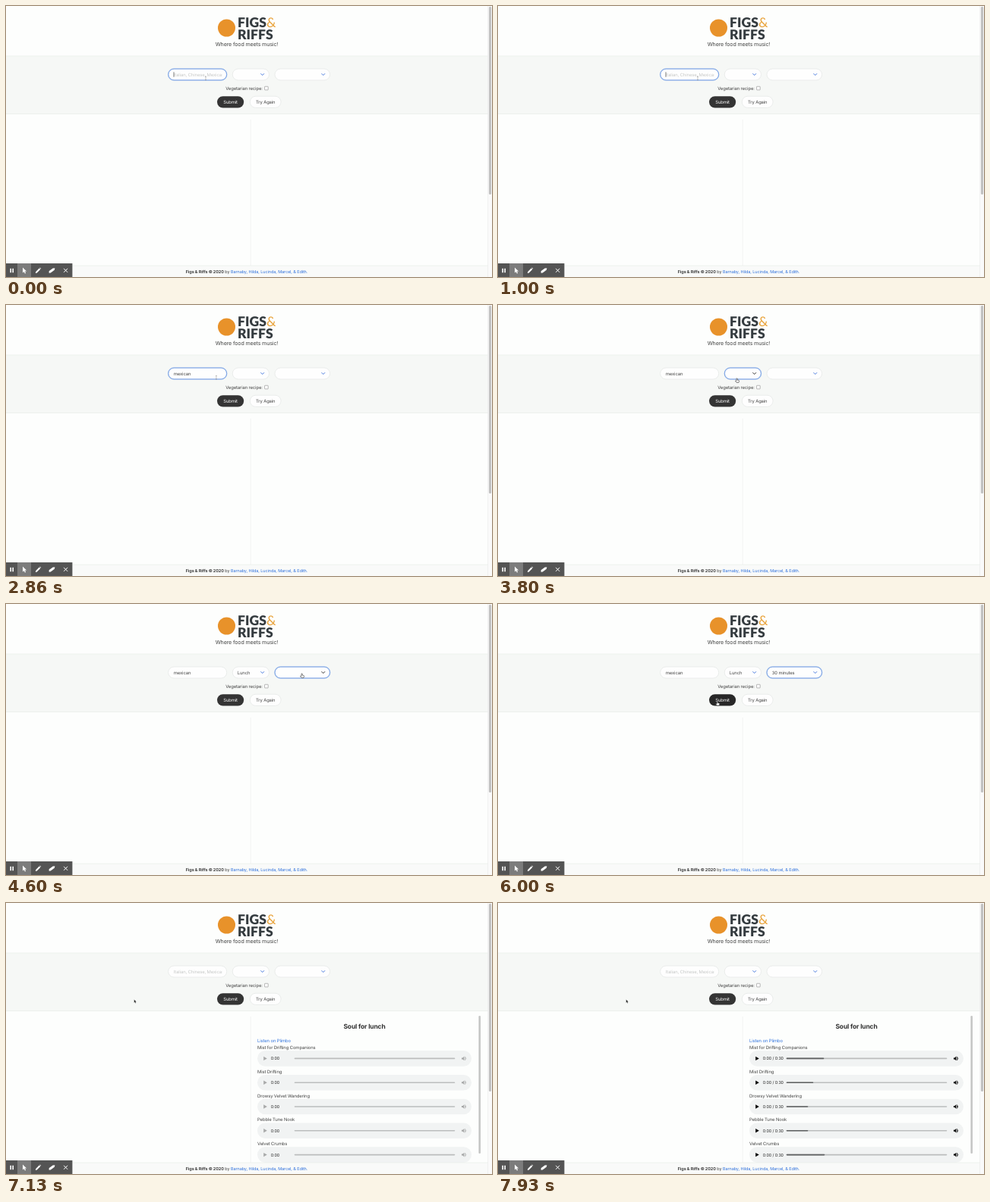
An HTML page that plays this animation: 640x358 px, repeating every 8 s.

```html
<!DOCTYPE html>
<html lang="en">
<head>
<meta charset="utf-8">
<title>Recipe and music search</title>
<style>
  html, body { margin: 0; width: 100%; height: 100%; overflow: hidden; background: #fdfefd; }
  svg { display: block; width: 100vw; height: 100vh; }
  text { font: 5.9px Inter, sans-serif; letter-spacing: -.02em; fill: #444; white-space: pre; text-rendering: geometricPrecision; }
  .mid { text-anchor: middle; }
  .brand { font: 900 17.6px Lato, sans-serif; letter-spacing: 0; fill: #343b3f; }
  .amp { font-weight: 400; fill: #e9a43c; }
  .tagline { font-size: 7.1px; }
  .footer { font-size: 5.55px; }
  .title { font-size: 8.5px; font-weight: 700; fill: #333; }
  .link { fill: #3273dc; }
  .bold { font-weight: 700; }
  .hint { fill: #c6c8c7; }
  .rule { stroke: #e9ece9; stroke-width: .7; }
  .field { fill: #fefefe; stroke: #e0e3e1; stroke-width: .6; }
  .halo { fill: none; stroke: #3273dc; stroke-opacity: .2; stroke-width: 1.7; }
  .ring { fill: none; stroke: #5b8fe6; stroke-width: .7; }
  .chevron { fill: none; stroke-width: 1; stroke-linecap: round; stroke-linejoin: round; }
</style>
</head>
<body>
<svg viewBox="0 0 640 358">
  <rect width="640" height="358" fill="#fdfefd"/>
  <rect y="66" width="635" height="76.5" fill="#f6f8f6"/>
  <path class="rule" d="M0 66H635M0 142.5H635"/>
  <path d="M322.2 150V343" stroke="#f0f1f0" stroke-width=".8"/>

  <circle cx="290.5" cy="29" r="11.5" fill="#e8922a"/>
  <text class="brand" x="305" y="27.6">FIGS<tspan class="amp">&amp;</tspan></text>
  <text class="brand" x="305" y="43.6">RIFFS</text>
  <text class="tagline mid" x="317" y="52.7">Where food meets music!</text>

  <g id="fields"></g>
  <clipPath id="inputClip"><rect x="219" y="84" width="65.3" height="13"/></clipPath>
  <g clip-path="url(#inputClip)">
    <text id="hint" class="hint" x="220.8" y="92.6">Italian, Chinese, Mexican</text>
    <text id="typed" x="220.8" y="92.6"></text>
    <rect id="caret" y="87.2" width=".6" height="6.6" fill="#333"/>
  </g>
  <text id="meal" x="304.8" y="92.6">Lunch</text>
  <text id="duration" x="360.8" y="92.6">30 minutes</text>

  <text x="289.2" y="110.6">Vegetarian recipe:</text>
  <rect x="340.6" y="106.3" width="4.6" height="4.6" rx=".5" fill="#fff" stroke="#888" stroke-width=".6"/>
  <rect id="submit" x="278" y="119.2" width="35.2" height="15.2" rx="7.6"/>
  <text class="mid" x="295.6" y="129" style="fill:#fff">Submit</text>
  <rect class="field" x="321.3" y="119.2" width="40.8" height="15.2" rx="7.6"/>
  <text class="mid" x="341.7" y="129">Try Again</text>

  <g id="playlist">
    <text class="title mid" x="472" y="166">Soul for lunch</text>
    <text class="link" x="331" y="183.9">Listen on Plimbo</text>
    <g id="tracks"></g>
    <rect x="622.4" y="149" width="2.6" height="182" rx="1.3" fill="#c6c7c6"/>
  </g>

  <rect y="343" width="635" height="15" fill="#f9faf9"/>
  <path class="rule" d="M0 343H635"/>
  <text class="footer mid" x="317" y="352.7"><tspan class="bold">Figs &amp; Riffs © 2020</tspan> by <tspan class="link">Barnaby, Hilda, Lucinda, Marcel, &amp; Edith.</tspan></text>

  <rect x="634.6" width="5.4" height="358" fill="#fafafa"/>
  <path d="M634.6 0V358" stroke="#e8e8e8" stroke-width=".6"/>
  <rect x="635.9" y=".8" width="3.2" height="248.2" rx="1.6" fill="#c1c1c1"/>

  <g fill="#fff">
    <path fill="#545454" d="M0 340H87.4V358H0Z"/>
    <path fill="#7c7c7c" d="M15 340H33V358H15Z"/>
    <path d="M5.4 346.7h1.6v5.6H5.4zM8.4 346.7H10v5.6H8.4z"/>
    <path d="M22 345.6v7l1.7-1.5 1.2 2.5 1.2-.6-1.2-2.4h2.2z"/>
    <path d="M38.8 352.9l.5-2 4.4-4.4 1.5 1.5-4.4 4.4zM44.2 346l.6-.6 1.5 1.5-.6.6z"/>
    <path d="M56.6 350.2l5-3.7 2.8-.3-.6 2.5-5 3.8-2.2.3z"/>
    <path d="M76.1 346.8l5 5M81.1 346.8l-5 5" stroke="#fff" stroke-width="1"/>
  </g>

  <g id="pointer">
    <path id="ibeam" fill="none" stroke="#8a8a8a" stroke-width=".5" d="M-1-2.6Q0-2.6 0-1.8 0-2.6 1-2.6M0-2V2M-1 2.6Q0 2.6 0 1.8 0 2.6 1 2.6"/>
    <path id="hand" fill="#fff" stroke="#333" stroke-width=".6" stroke-linejoin="round" d="M-.6.2Q0-.5.6.2V2L2.7 2.6Q3.2 2.8 3 3.6L2.4 5.4H-.6L-2.1 3.4Q-2 2.6-.6 3.3Z"/>
    <path id="arrow" fill="#111" stroke="#fff" stroke-width=".3" d="M0 0V4.4L1 3.5 1.7 5 2.5 4.7 1.8 3.2H3.1Z"/>
  </g>
</svg>
<script>
const LOOP = 8000;
const KEY_TIMES = [1260, 1380, 1470, 1590, 1690, 1800, 1900];
const MEAL_CLICK = 3300, MEAL_CHOSEN = 4000, TIME_CLICK = 4500, TIME_CHOSEN = 5060;
const SUBMITTED = 6080, PLAYLIST_SHOWN = 6950;

const $ = id => document.getElementById(id);
const show = (element, visible) => element.setAttribute("visibility", visible ? "inherit" : "hidden");

const fields = [
  { x: 213.7, width: 77, focused: t => t < MEAL_CLICK },
  { x: 298.3, width: 48.2, select: true, focused: t => t >= MEAL_CLICK && t < TIME_CLICK },
  { x: 354, width: 72.6, select: true, focused: t => t >= TIME_CLICK && t < SUBMITTED }
];
$("fields").innerHTML = fields.map(({ x, width, select }) => {
  const pill = name => `<rect class="${name}" x="${x}" y="83" width="${width}" height="15" rx="7.5"/>`;
  const arrow = select ? `<path class="chevron" d="M${x + width - 10.8} 89.5l2 2 2-2"/>` : "";
  return `<g>${pill("field")}<g class="focus">${pill("halo")}${pill("ring")}</g>${arrow}</g>`;
}).join("");
fields.forEach((field, i) => {
  const group = $("fields").children[i];
  field.focusRing = group.querySelector(".focus");
  field.chevron = group.querySelector(".chevron");
});

const tracks = [
  ["Mist for Drifting Companions", 429],
  ["Mist Drifting", 415],
  ["Drowsy Velvet Wandering", 408],
  ["Pebble Tune Nook", 408],
  ["Velvet Crumbs", 430]
];
$("tracks").innerHTML = tracks.map(([name, buffered], i) => `
  <g transform="translate(0 ${205.4 + i * 31.8})">
    <text x="331" y="-12.5">${name}</text>
    <rect x="331" y="-10.3" width="282" height="20.6" rx="10.3" fill="#f1f3f3"/>
    <g class="icons">
      <path d="M339.2-2.7L343.8 0 339.2 2.7Z"/>
      <path d="M600-1h1.4l1.9-1.8v5.6L601.4 1H600z"/>
      <path d="M604-1.4q1.3 1.4 0 2.8M604.3-2.6q3 2.6 0 5.2" fill="none" stroke="#000" stroke-width=".7"/>
    </g>
    <text class="clock" x="348.7" y="2" style="font-size:5.4px;fill:#222"></text>
    <path d="M380.5 0H590.5" stroke="#bbbdbd" stroke-width="1.6" stroke-linecap="round"/>
    <path class="buffer" d="M380.5 0H${buffered - .5}" stroke="#606263" stroke-width="1.6" stroke-linecap="round"/>
  </g>`).join("");

// Pointer stops: time, x, y
const stops = [
  [0, 263, 95.4], [2660, 263, 95.4], [3250, 314.6, 97], [4020, 314.6, 97],
  [4420, 389.6, 92], [5480, 389.6, 92], [5900, 288.8, 128.6],
  [6100, 288.8, 128.6], [6330, 173, 128], [6430, 168.7, 127.4], [LOOP, 168.7, 127.4]
];

function pointerAt(t) {
  const next = stops.findIndex(stop => stop[0] > t);
  const [t0, x0, y0] = stops[next - 1], [t1, x1, y1] = stops[next];
  const p = (t - t0) / (t1 - t0), eased = p * p * (3 - 2 * p);
  return [x0 + (x1 - x0) * eased, y0 + (y1 - y0) * eased];
}

function caretVisible(t) {
  return t < 460 || (t >= 1000 && t < 2400) || (t >= 2900 && t < MEAL_CLICK);
}

function render(t) {
  const [px, py] = pointerAt(t);
  const over = (x, y, width) => px >= x && px <= x + width && py >= y && py <= y + 15.2;
  const hovered = fields.map(({ x, width }) => over(x, 83, width));
  const onSubmit = over(278, 119.2, 35.2);

  const letters = t < SUBMITTED ? KEY_TIMES.filter(time => t >= time).length : 0;
  $("typed").textContent = "mexican".slice(0, letters);
  show($("hint"), !letters);
  show($("caret"), caretVisible(t));
  $("caret").setAttribute("x", 220.7 + (letters ? $("typed").getComputedTextLength() : 0));
  show($("meal"), t >= MEAL_CHOSEN && t < SUBMITTED);
  show($("duration"), t >= TIME_CHOSEN && t < SUBMITTED);

  fields.forEach(({ focused, focusRing, chevron }, i) => {
    show(focusRing, focused(t));
    chevron?.setAttribute("stroke", hovered[i] ? "#333" : "#4a7bde");
  });
  $("submit").setAttribute("fill", onSubmit ? "#272727" : "#343434");

  show($("playlist"), t >= PLAYLIST_SHOWN);
  [...$("tracks").children].forEach((track, i) => {
    const loaded = t >= 7260 + i * 130;
    track.querySelector(".icons").setAttribute("opacity", loaded ? 1 : .3);
    track.querySelector(".clock").textContent = loaded ? "0:00 / 0:30" : "0:00";
    show(track.querySelector(".buffer"), loaded);
  });

  const shape = hovered[0] ? "ibeam" : hovered[1] || hovered[2] || onSubmit ? "hand" : "arrow";
  for (const id of ["ibeam", "hand", "arrow"]) show($(id), id === shape);
  $("pointer").setAttribute("transform", `translate(${px} ${py})`);
}

const start = performance.now();
function tick() {
  render((performance.now() - start) % LOOP);
  requestAnimationFrame(tick);
}
tick();
</script>
</body>
</html>
```
